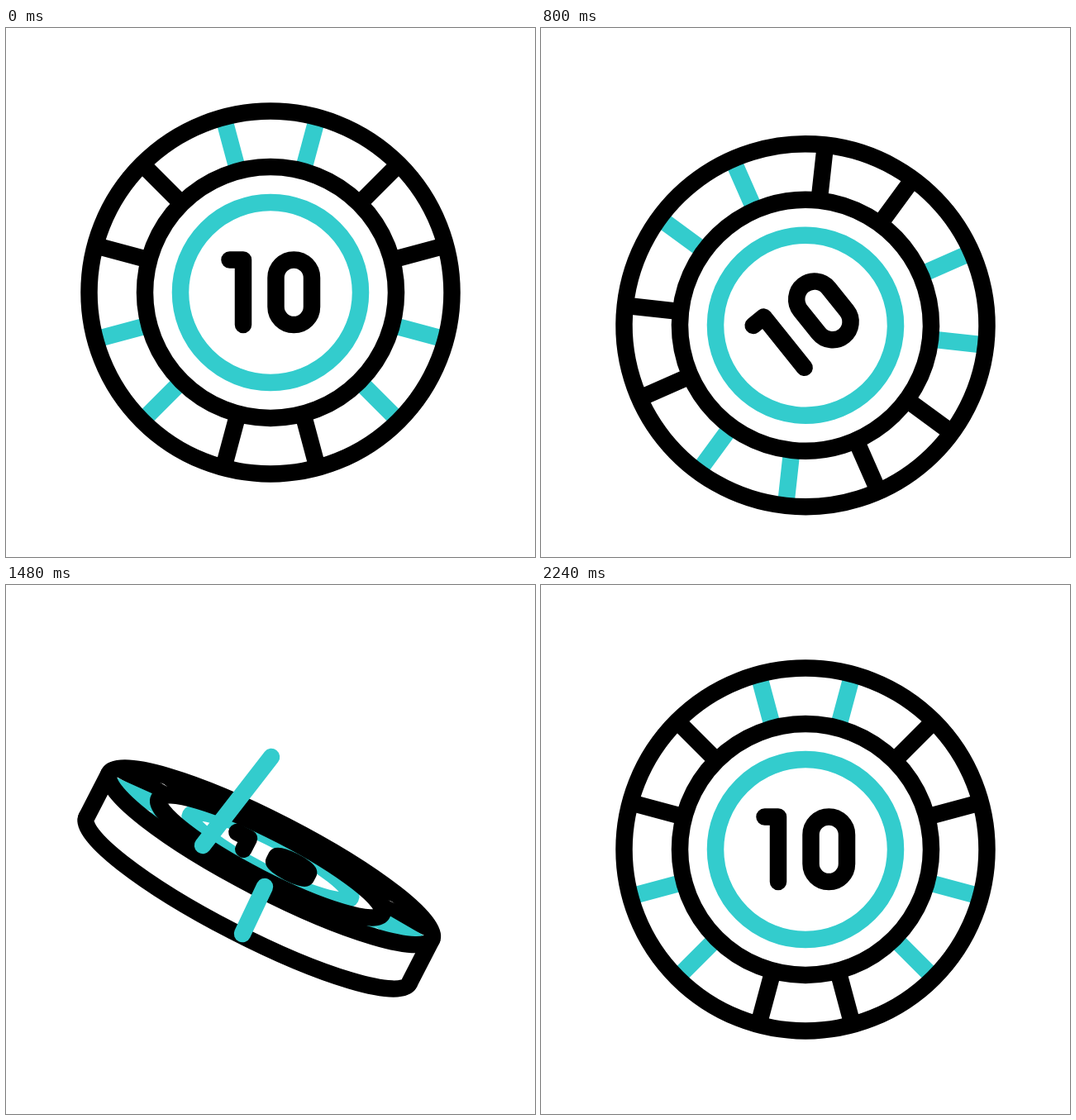
These frames come from a looping animation (640 by 640 pixels, 2400 ms). An HTML page with a canvas:

```html
<!DOCTYPE html>
<html lang="en">
<head>
<meta charset="utf-8">
<title>Casino chip flip</title>
<style>
  html, body { margin: 0; width: 100%; height: 100%; overflow: hidden; background: #fff; }
  canvas { display: block; width: 640px; height: 640px; }
</style>
</head>
<body>
<canvas id="stage" width="640" height="640"></canvas>
<script>
const ctx = document.getElementById('stage').getContext('2d');
const LOOP = 2400, BLACK = '#000', TEAL = '#33cccd', LINE = 20.5;
const RIM = 219.5, RING = 152, CORE = 109;

// Keys are [time, value]; the curve between them never overshoots.
const posX = [[1480, 320], [1800, 325], [2240, 320]];
const posY = [[220, 320], [480, 350], [722, 371.5], [760, 369.5], [800, 360], [1060, 288],
              [1200, 260], [1300, 268], [1480, 328], [1610, 364], [1800, 352], [2240, 320]];
const turn = [[220, 0], [480, -14.8], [735, -43], [800, -38.8], [1060, -16],
              [1480, 27.2], [1520, 28.5], [1800, 17.5], [2240, 0]];
const flip = [[980, 1], [1060, 0.905], [1480, 0.19], [1590, 0], [1800, -0.333], [2240, -1]];

// Streaks: start point, end point, birth, full length, start of fading, gone
const streaks = [
  [397, 538, 450, 485, 1040, 1140, 1140, 1240],
  [321, 208, 238, 315, 1380, 1480, 1490, 1590],
  [313, 365, 286, 422, 1400, 1480, 1490, 1580]
];

const clamp = v => Math.max(0, Math.min(1, v));

function sample(keys, t) {
  const last = keys.length - 1;
  if (t <= keys[0][0]) return keys[0][1];
  if (t >= keys[last][0]) return keys[last][1];
  const slope = i => (keys[i + 1][1] - keys[i][1]) / (keys[i + 1][0] - keys[i][0]);
  const tangent = i => {
    if (i === 0 || i === last) return 0;
    const a = slope(i - 1), b = slope(i);
    return a * b > 0 ? 2 * a * b / (a + b) : 0;
  };
  const i = keys.findIndex(k => k[0] > t) - 1;
  const [t0, v0] = keys[i], [t1, v1] = keys[i + 1];
  const span = t1 - t0, u = (t - t0) / span, w = 1 - u;
  return v0 * w * w * (1 + 2 * u) + v1 * u * u * (3 - 2 * u)
       + span * u * w * (tangent(i) * w - tangent(i + 1) * u);
}

function paint(path, color, fill) {
  if (fill) { ctx.fillStyle = fill; ctx.fill(path); }
  if (color) { ctx.strokeStyle = color; ctx.stroke(path); }
}

// Places a flat path on the tilted chip, so that line weights stay constant.
function place(path, x, y, angle, squash) {
  const c = Math.cos(angle), s = Math.sin(angle), out = new Path2D();
  out.addPath(path, new DOMMatrix([c, s, -s * squash, c * squash, x, y]));
  return out;
}

function circle(r) {
  const p = new Path2D();
  p.arc(0, 0, r, 0, 7);
  return p;
}

function spokes(teal) {
  const p = new Path2D();
  for (let i = 0; i < 12; i++) {
    if ((i + 1) % 4 < 2 !== teal) continue;
    const a = (15 + 30 * i) * Math.PI / 180, x = Math.sin(a), y = -Math.cos(a);
    p.moveTo(x * RING, y * RING);
    p.lineTo(x * RIM, y * RIM);
  }
  return p;
}

const rim = circle(RIM), ring = circle(RING), core = circle(CORE);
const blackSpokes = spokes(false), tealSpokes = spokes(true);
const digits = new Path2D('M-49.5-39.5H-33V39');
digits.roundRect(6.5, -39.5, 43.5, 78.5, 21.75);

function drawChip(t) {
  const x = sample(posX, t), y = sample(posY, t);
  const angle = sample(turn, t) * Math.PI / 180;
  const tilt = sample(flip, t), squash = Math.max(0.001, Math.abs(tilt));
  const depth = Math.min(60, 88 * (1 - squash));
  const c = Math.cos(angle), s = Math.sin(angle);
  const top = [x, y], bottom = [x - s * depth, y + c * depth];
  const [face, back] = tilt >= 0 ? [top, bottom] : [bottom, top];
  const onFace = p => place(p, ...face, angle, squash);

  ctx.lineWidth = LINE;
  ctx.lineJoin = 'round';
  if (depth > 0.1) {
    paint(place(rim, ...back, angle, squash), BLACK, '#fff');
    const wall = new Path2D(), edges = new Path2D();
    const tip = (p, side) => [p[0] + side * c * RIM, p[1] + side * s * RIM];
    wall.moveTo(...tip(back, -1));
    wall.lineTo(...tip(face, -1));
    wall.lineTo(...tip(face, 1));
    wall.lineTo(...tip(back, 1));
    for (const side of [-1, 1]) {
      edges.moveTo(...tip(back, side));
      edges.lineTo(...tip(face, side));
    }
    paint(wall, null, '#fff');
    ctx.lineCap = 'round';
    paint(edges, BLACK);
  }

  const outline = onFace(rim);
  paint(outline, null, '#fff');
  ctx.lineCap = 'butt';
  paint(onFace(blackSpokes), BLACK);
  paint(onFace(tealSpokes), TEAL);
  paint(onFace(ring), null, '#fff');
  paint(onFace(core), TEAL);
  paint(onFace(ring), BLACK);
  paint(outline, BLACK);
  ctx.lineCap = 'round';
  paint(onFace(digits), BLACK);
}

function drawStreaks(t) {
  for (const [x0, y0, x1, y1, born, full, fade, gone] of streaks) {
    if (t <= born || t >= gone) continue;
    const head = clamp((t - born) / (full - born)), tail = clamp((t - fade) / (gone - fade));
    const p = new Path2D();
    p.moveTo(x0 + (x1 - x0) * tail, y0 + (y1 - y0) * tail);
    p.lineTo(x0 + (x1 - x0) * head, y0 + (y1 - y0) * head);
    paint(p, TEAL);
  }
}

function frame() {
  const t = performance.now() % LOOP;
  ctx.fillStyle = '#fff';
  ctx.fillRect(0, 0, 640, 640);
  drawChip(t);
  drawStreaks(t);
  requestAnimationFrame(frame);
}
frame();
</script>
</body>
</html>
```
